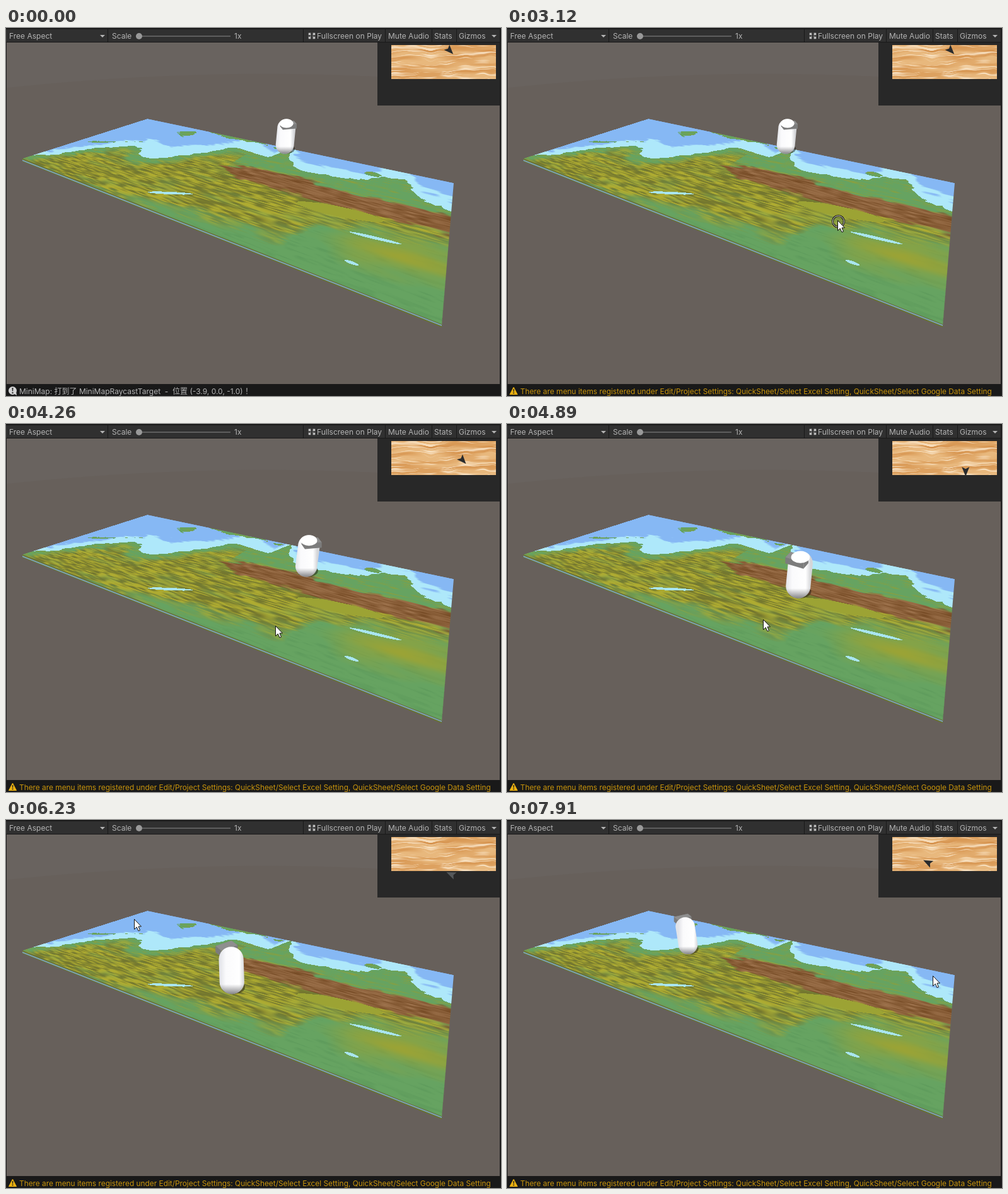
An HTML page with a canvas for the animation above (7.99 s loop, 785x584 px).

```html
<!DOCTYPE html>
<html lang="en">
<head>
<meta charset="utf-8">
<title>Map scene with minimap</title>
<style>
html, body { margin: 0; width: 100%; height: 100%; overflow: hidden; background: #191919; }
canvas, svg { position: absolute; left: 0; top: 0; }
text { font: 12px Inter, "Noto Sans CJK SC", "Noto Sans CJK JP", "Noto Sans CJK", sans-serif; white-space: pre; fill: #b4b4b4; }
#warn text { font-size: 11.87px; fill: #c8940c; }
</style>
</head>
<body>
<canvas id="scene" width="785" height="584"></canvas>
<svg width="785" height="584">
  <path fill="#303030" d="M0 0h785v22H0z"/>
  <path fill="#191919" d="M0 0h785v2H0zM0 22h785v1H0zM161 2h1v20h-1zM601 2h1v20h-1zM675 2h1v20h-1zM714 2h1v20h-1zM0 22h1v543H0zM783 2h2v563h-2zM0 565h785v19H0z"/>
  <path fill="#b4b4b4" d="M149 11h8l-4 4zM770 11h8l-4 4z"/>
  <path fill="#5e5e5e" d="M206 12h150v2H206z"/>
  <circle cx="211" cy="13" r="5" fill="#999"/>
  <text x="5" y="17">Free Aspect</text>
  <text x="168" y="17">Scale</text>
  <text x="362" y="17">1x</text>
  <g id="full">
    <path fill="#191919" d="M471 2h1v20h-1z"/>
    <path fill="none" stroke="#c4c4c4" stroke-width="1.5" d="M480.500 11.500v-3h3m3 0h3v3m0 2v3h-3m-3 0h-3v-3m0-5l3 3m6-3l-3 3m3 5l-3-3m-6 3l3-3"/>
    <text x="493" y="17">Fullscreen on Play</text>
  </g>
  <g id="max">
    <path fill="#191919" d="M490 2h1v20h-1z"/>
    <text x="494" y="17">Maximize On Play</text>
  </g>
  <text x="606" y="17">Mute Audio</text>
  <text x="679" y="17">Stats</text>
  <text x="718" y="17">Gizmos</text>
  <g id="info">
    <circle cx="10.5" cy="575.5" r="6.5" fill="#d4d4d4"/>
    <path fill="#d4d4d4" d="M12 580l5 3-1-6z"/>
    <path fill="#222" d="M9.5 571h2l-.4 5.5H9.9zM9.5 578h2v2h-2z"/>
    <text x="21" y="581">MiniMap: 打到了 MiniMapRaycastTarget  -  位置 (-3.9, 0.0, -1.0) ！</text>
  </g>
  <g id="warn">
    <path fill="#eab010" stroke="#eab010" stroke-linejoin="round" d="M10.500 570l6 11.500h-12z"/>
    <path fill="#222" d="M9.700 573h1.700l-.3 4.500H10zM9.700 578.500h1.700v1.700H9.700z"/>
    <text x="21" y="581">There are menu items registered under Edit/Project Settings: QuickSheet/Select Excel Setting, QuickSheet/Select Google Data Setting</text>
  </g>
</svg>
<canvas id="actors" width="785" height="584"></canvas>
<script>
const el = id => document.getElementById(id);
const bg = el('scene').getContext('2d'), fx = el('actors').getContext('2d');
const mix = (a, b, k) => a + (b - a) * k;
const clamp = k => Math.max(0, Math.min(1, k));
const blend = (p, q, k) => p.map((v, i) => mix(v, q[i], clamp(k)));

// Smooth curve through rows [position, ...values] that never overshoots them.
function along(rows, t) {
  const last = rows.length - 1;
  if (t <= rows[0][0]) return rows[0].slice(1);
  if (t >= rows[last][0]) return rows[last].slice(1);
  const i = rows.findIndex(r => r[0] > t) - 1;
  const step = rows[i + 1][0] - rows[i][0], k = (t - rows[i][0]) / step;
  const slope = (j, c) => (rows[j + 1][c] - rows[j][c]) / (rows[j + 1][0] - rows[j][0]);
  const tangent = (j, c) => {
    const p = slope(Math.max(j - 1, 0), c), q = slope(Math.min(j, last - 1), c);
    return p * q > 0 ? 2 * p * q / (p + q) : 0;
  };
  return rows[i].slice(1).map((a, n) => {
    const c = n + 1, ease = k * k * (3 - 2 * k);
    return mix(a, rows[i + 1][c], ease) +
      step * k * (1 - k) * ((1 - k) * tangent(i, c) - k * tangent(i + 1, c));
  });
}

const hash = (i, j) => {
  const s = Math.sin(i * 127.1 + j * 311.7) * 43758.5453;
  return s - Math.floor(s);
};
function noise(x, y) {
  const i = Math.floor(x), j = Math.floor(y);
  const k = (x - i) ** 2 * (3 - 2 * (x - i)), m = (y - j) ** 2 * (3 - 2 * (y - j));
  return mix(mix(hash(i, j), hash(i + 1, j), k), mix(hash(i, j + 1), hash(i + 1, j + 1), k), m);
}

// Perspective of the ground plate: u runs along its long side, v from back to front.
const [a, b, c, d, e, f, g, h] = [209.4, -205.3, 224, 6.15, 4.98, 144, -.3896, -.2803];
const depth = (u, v) => 1 + g * u + h * v;
const project = (u, v) => [(a * u + b * v + c) / depth(u, v), (d * u + e * v + f) / depth(u, v)];
function unproject(x, y) {
  const p = a - x * g, q = b - x * h, r = d - y * g, s = e - y * h, det = p * s - q * r;
  return [((x - c) * s - q * (y - f)) / det, (p * (y - f) - r * (x - c)) / det];
}

function polygon(points) {
  const path = new Path2D();
  points.forEach(p => path.lineTo(...p));
  path.closePath();
  return path;
}
function fill(ctx, path, color) {
  ctx.fillStyle = color;
  ctx.fill(path);
}

// Colours a rectangle pixel by pixel, clipped to a path.
function paint(x0, y0, w, h, path, color) {
  const tile = Object.assign(document.createElement('canvas'), { width: w, height: h });
  const ctx = tile.getContext('2d'), img = ctx.createImageData(w, h);
  for (let i = 0; i < w * h; i++) {
    const x = x0 + i % w, y = y0 + Math.floor(i / w);
    if (bg.isPointInStroke(path, x, y) || bg.isPointInPath(path, x, y))
      img.data.set([...color(x, y), 255], i * 4);
  }
  ctx.putImageData(img, 0, 0);
  bg.save();
  bg.clip(path);
  bg.drawImage(tile, x0, y0);
  bg.restore();
}

const coast = [[0, .95], [.06, .8], [.13, .58], [.2, .51], [.27, .6], [.4, .32], [.45, .16], [.56, .2], [.59, 0], [.62, .18], [.68, .26], [.82, .22], [.86, .09], [.9, .09], [.94, .26], [1, .31]];
const foothill = [[0, 1.15], [.74, .9], [.8, .74], [1, .58]];
// Ellipses: u, v, radius u, radius v, slant
const islands = [[.08, .54, .08, .02, -1.45], [.24, .13, .025, .06, 0], [.43, .01, .1, .03, .1], [.831, .11, .014, .03, 0]];
const lakes = [[.475, .845, .045, .014, -1.1], [.89, .69, .042, .01, -.3], [.873, .879, .011, .008, 0]];
const reach = (u, v, [cu, cv, ru, rv, slant]) =>
  Math.hypot((u - cu) / ru, (v - cv - slant * (u - cu)) / rv);

const deep = [134, 184, 244], shallow = [174, 232, 250], meadow = [102, 163, 97];
const olive = [156, 163, 52], yellow = [184, 176, 48], dark = [94, 96, 44], brown = [138, 95, 57];

function terrain(x, y) {
  const [u, v] = unproject(x, y);
  const fine = noise(u * 45, v * 130), rough = noise(u * 16 + 9, v * 26) - .5;
  const wave = rough * .6 + (noise(u * 60, v * 60) - .5) * .4;
  const [shore] = along(coast, u);
  const isle = islands.some(i => reach(u, v, i) < .9 + wave * 2);
  const off = shore - v + wave * .07;
  if (off > 0 && !isle) {
    const shelf = .09 + .13 * Math.exp(-(((u - .32) / .12) ** 2));
    return blend(shallow, deep, (off - shelf + wave * .08) * 25);
  }
  if (lakes.some(l => reach(u, v, l) < 1)) return [169, 229, 239];
  if (reach(u, v, [.81, .575, .085, .042, -.3]) < 1 + wave * .2) return olive;

  const ridge = 1 - Math.abs(v - .45) / .088 - Math.max(0, .56 - u) * 14 + wave * .9;
  const rock = blend(dark, yellow, (fine - .2) * 1.7);
  const slopes = blend(blend(rock, olive, .35), meadow, rough * .7);
  const upper = u < .5 ? shore + .07 : .37;
  const height = Math.min(v - upper, along(foothill, u)[0] - v) / .11 + rough * 1.3 + fine * .4;
  const plain = blend(meadow, [82, 143, 84], (fine - .55) * .9);
  const grass = blend(plain, olive, .75 * (1.25 - reach(u, v, [.94, .74, .13, .12, -.3])) + rough * .4);
  const green = v < upper + .1 ? blend(grass, olive, (fine - .5) * 1.4) : grass;
  const land = blend(green, slopes, height);
  return blend(land, brown.map(n => n + (fine - .5) * 40), ridge * 5);
}

function wood(x, y) {
  const warp = noise(x / 14, y / 9) * 5 + noise(x / 40, y / 20) * 8;
  const grain = noise(x / 28, (y + warp) / 1.5), band = noise(x / 45 + 5, (y + warp) / 5);
  return blend(blend([211, 141, 70], [232, 184, 125], band * 1.3), [252, 234, 208], (grain - .55) * 2.2);
}

function paintScene() {
  bg.fillStyle = '#67605b';
  bg.fillRect(0, 22, 785, 543);
  fill(bg, new Path2D('M0 23H785V92Q400 52 0 95z'), '#69635f');

  const corners = [[0, 0], [1, 0], [1, 1], [0, 1]].map(p => project(...p));
  const [back, right, front, left] = corners;
  const lower = ([x, y], n) => [x, y + n];
  fill(bg, polygon([left, front, right, lower(front, 5), lower(left, 5)]), '#68722f');
  fill(bg, polygon([lower(left, 2), lower(front, 1), right, lower(front, 3), lower(left, 4)]), '#7ba3bd');
  paint(20, 140, 700, 336, polygon(corners), terrain);

  bg.fillStyle = '#282828';
  bg.fillRect(589, 23, 194, 100);
  paint(611, 27, 166, 54, polygon([[611, 27], [777, 27], [777, 81], [611, 81]]), wood);
}

// Time, x, y
const pointer = [[1430, 653, 9], [1790, 561, 155], [2600, 524, 305], [3300, 524, 305], [4260, 427, 320], [4710, 419, 322], [5420, 328, 225], [6230, 203, 157], [7130, 450, 268], [7910, 675, 247]];
// Time, u, v
const walk = [[3120, .583, .053], [4260, .7, .337], [4500, .721, .4], [5420, .722, .766], [5780, .69, .8], [6230, .604, .729], [7910, .384, .483]];
// The minimap shows the plate at this many pixels per unit of u and v.
const mapU = 175, mapV = 76;

function walker(t) {
  const [u, v] = along(walk, t), s = Math.max(3120, Math.min(t, 7890));
  const [p, q] = [along(walk, s), along(walk, s + 10)];
  return { u, v, angle: Math.atan2((q[1] - p[1]) * mapV, (q[0] - p[0]) * mapU) };
}

function drawVisor({ u, v, angle }, x, y, scale) {
  const [fx0, fy0] = project(u, v), cos = Math.cos(angle), sin = Math.sin(angle);
  const corner = (ahead, side, drop) => {
    const [px, py] = project(u + (ahead * cos - side * sin) / mapU, v + (ahead * sin + side * cos) / mapV);
    return [x + px - fx0, y + py - fy0 + drop * scale];
  };
  const ring = [[1, -3.5], [5.3, -3.5], [5.3, 3.5], [1, 3.5]];
  ring.forEach((p, i) => {
    const q = ring[(i + 1) % 4];
    fill(fx, polygon([corner(...p, 2), corner(...q, 2), corner(...q, 7.5), corner(...p, 7.5)]), '#7c7c7c');
  });
  fill(fx, polygon(ring.map(p => corner(...p, 2))), '#8e8e8e');
}

function drawBody(man) {
  const scale = 1 / depth(man.u, man.v), r = 11 * scale;
  const [x, y] = project(man.u, man.v), foot = y + 3.5 * scale, top = foot - 42 * scale;
  const headX = x + (x - 385) * .045, facing = Math.sin(man.angle) > 0;
  fx.fillStyle = 'rgba(30,25,20,.5)';
  fx.beginPath();
  fx.ellipse(x + 2, foot - r * .55, r * .95, r * .55, 0, 0, 7);
  fx.fill();
  if (!facing) drawVisor(man, headX, top, scale);

  const body = new Path2D();
  body.arc(headX, top + r, r, Math.PI, 0);
  body.arc(x, foot - r, r, 0, Math.PI);
  body.closePath();
  const side = fx.createLinearGradient(x - r, 0, x + r, 0);
  side.addColorStop(0, '#e2e3e8');
  side.addColorStop(.25, '#fafafc');
  side.addColorStop(.8, '#fff');
  side.addColorStop(1, '#d4d5d8');
  fill(fx, body, side);
  const base = fx.createLinearGradient(0, foot - r * .8, 0, foot);
  base.addColorStop(0, 'rgba(90,90,95,0)');
  base.addColorStop(1, 'rgba(80,80,84,.7)');
  fill(fx, body, base);
  if (!facing) return;

  drawVisor(man, headX, top, scale);
  fx.fillStyle = '#fff';
  fx.beginPath();
  fx.ellipse(headX, top + r * .5, r * .75, r * .48, 0, 0, 7);
  fx.fill();
}

const dart = polygon([[9, 0], [-6, -6], [-3, 0], [-6, 6]]);
function drawMarker({ u, v, angle }) {
  const y = 31 + mapV * v;
  fx.save();
  fx.translate(601 + mapU * u, y);
  fx.rotate(angle);
  fill(fx, dart, y > 81 ? '#55585a' : '#292b2d');
  fx.restore();
}

const arrow = new Path2D('M.5 .5V16.500L4.300 13L7 19L9.500 18L7 12H11.500z');
function drawPointer(t) {
  if (t < 590) return;
  const [x, y] = t < 680 ? [660, 0] : along(pointer, t);
  if (t >= 3120 && t < 3300) {
    for (const [width, color] of [[3, '#111'], [1, '#e8e8d8']]) {
      fx.beginPath();
      fx.arc(x + 1.5, y + 2, 9, 0, 7);
      fx.lineWidth = width;
      fx.strokeStyle = color;
      fx.stroke();
    }
  }
  fx.save();
  fx.translate(x, y);
  fill(fx, arrow, '#fff');
  fx.lineWidth = 1;
  fx.strokeStyle = '#111';
  fx.stroke(arrow);
  fx.restore();
}

const show = (id, on) => el(id).style.display = on ? '' : 'none';
function frame(now) {
  const t = now % 7990, man = walker(t);
  const maximize = t >= 1430 && t < 2600, warned = t >= 2600;
  show('max', maximize);
  show('full', !maximize);
  show('warn', warned);
  show('info', !warned);
  fx.clearRect(0, 0, 785, 584);
  drawBody(man);
  drawMarker(man);
  drawPointer(t);
  requestAnimationFrame(frame);
}

paintScene();
frame(0);
</script>
</body>
</html>
```
